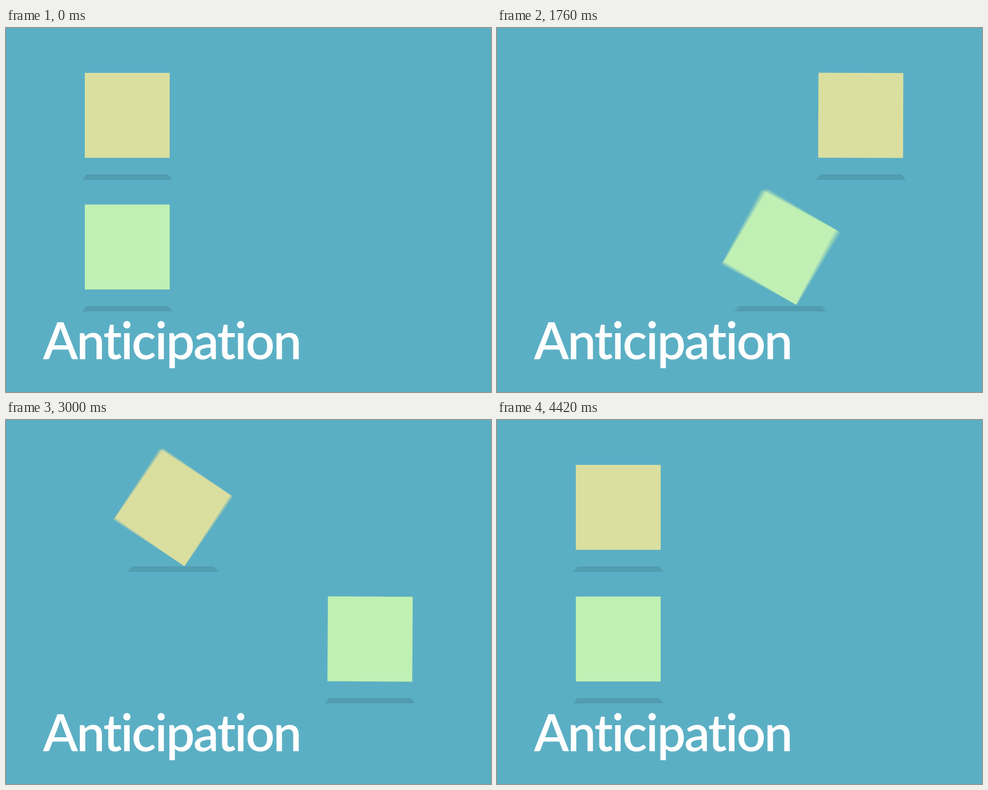
An HTML page with a canvas that plays this animation: 800 px wide and 600 px high, repeating every 4.54 s.

```html
<!DOCTYPE html>
<html lang="en">
<head>
<meta charset="utf-8">
<title>Anticipation</title>
<style>
  html, body { margin: 0; width: 800px; height: 600px; overflow: hidden; background: #5bafc4; }
  canvas, svg { position: absolute; left: 0; top: 0; display: block; }
  text { font: 600 84px Lato, "Open Sans", sans-serif; letter-spacing: -2.3px; fill: #fff; }
</style>
</head>
<body>
<canvas id="stage" width="800" height="600"></canvas>
<svg width="800" height="600"><text x="61" y="546">Anticipation</text></svg>
<script>
const LOOP = 4540, FRAME = 20, SHUTTER = 10, SAMPLES = 8;
const RETURN = 2140;   // delay between the way out and the way back
const HALF = 70;
const RAD = Math.PI / 180;

const view = document.getElementById('stage').getContext('2d');
const layer = document.createElement('canvas');
layer.width = 800;
layer.height = 600;
const ctx = layer.getContext('2d');

// Eased progress along a cubic curve with handles (a, 0) and (b, 1).
function ease(t, start, length, a = 0.54, b = 0.27) {
  const x = (t - start) / length;
  if (x <= 0) return 0;
  if (x >= 1) return 1;
  let lo = 0, hi = 1;
  for (let i = 0; i < 26; i++) {
    const s = (lo + hi) / 2, r = 1 - s;
    if (3 * a * s * r * r + 3 * b * s * s * r + s * s * s < x) lo = s;
    else hi = s;
  }
  return lo * lo * (3 - 2 * lo);
}

function plainBox(t) {
  const p = ease(t, 240, 1095, 0.54, 0.25) - ease(t, 2377, 1037, 0.56, 0.3);
  return { x: 200 + 400 * p, y: 144, angle: 180.2 * p, twist: 0, color: '#dadfa0' };
}

function windUp(t) {
  const wind = ease(t, 823, 400), go = ease(t, 1223, 1040);
  return {
    shift: 450 * go - 50 * wind,
    angle: 205 * go - 25 * wind,
    twist: wind - ease(t, 1223, 420)
  };
}

function eagerBox(t) {
  const out = windUp(t), back = windUp(t - RETURN);
  return {
    x: 200 + out.shift - back.shift, y: 361,
    angle: out.angle - back.angle,
    twist: out.twist - back.twist, color: '#c0f0b4'
  };
}

// Swirl a point around a centre off the middle of the box, with a slight slide.
function swirl(x, y, twist) {
  const cx = -10, cy = -12, reach = 130;
  const dx = x - cx, dy = y - cy;
  const fall = Math.max(0, 1 - Math.hypot(dx, dy) / reach);
  const turn = 36 * RAD * twist * fall * fall;
  const c = Math.cos(turn), s = Math.sin(turn);
  return [
    cx + dx * c + dy * s - 3.7 * twist,
    cy - dx * s + dy * c + 1.5 * twist
  ];
}

function drawShadow({ x, y }) {
  const top = y + 97.3, bottom = y + 106.3;
  ctx.fillStyle = 'rgba(0, 0, 0, 0.11)';
  ctx.beginPath();
  ctx.moveTo(x - 67, top);
  ctx.lineTo(x + 67, top);
  ctx.lineTo(x + 74.5, bottom);
  ctx.lineTo(x - 74.5, bottom);
  ctx.fill();
}

function drawBox(box) {
  drawShadow(box);
  ctx.save();
  ctx.translate(box.x, box.y);
  ctx.rotate(box.angle * RAD);
  ctx.fillStyle = box.color;
  if (Math.abs(box.twist) < 1e-4) {
    ctx.fillRect(-HALF, -HALF, 2 * HALF, 2 * HALF);
  } else {
    const steps = 24;
    ctx.beginPath();
    for (let side = 0; side < 4; side++) {
      const c = [1, 0, -1, 0][side], s = [0, 1, 0, -1][side];
      for (let i = 0; i < steps; i++) {
        const along = HALF * (2 * i / steps - 1);
        ctx.lineTo(...swirl(along * c + HALF * s, along * s - HALF * c, box.twist));
      }
    }
    ctx.fill();
  }
  ctx.restore();
}

function drawScene(t) {
  ctx.fillStyle = '#5bafc4';
  ctx.fillRect(0, 0, 800, 600);
  drawBox(plainBox(t));
  drawBox(eagerBox(t));
}

function travel(box, t) {
  return Math.abs(box(t + SHUTTER / 2).x - box(t - SHUTTER / 2).x);
}

function render(t) {
  const moving = Math.max(travel(plainBox, t), travel(eagerBox, t)) > 0.4;
  const count = moving ? SAMPLES : 1;
  for (let i = 0; i < count; i++) {
    drawScene(t + SHUTTER * ((i + 0.5) / count - 0.5));
    view.globalAlpha = 1 / (i + 1);
    view.drawImage(layer, 0, 0);
  }
}

const begin = performance.now();
function tick() {
  const t = (performance.now() - begin) % LOOP;
  render(Math.floor(t / FRAME) * FRAME);
  requestAnimationFrame(tick);
}
tick();
</script>
</body>
</html>
```
